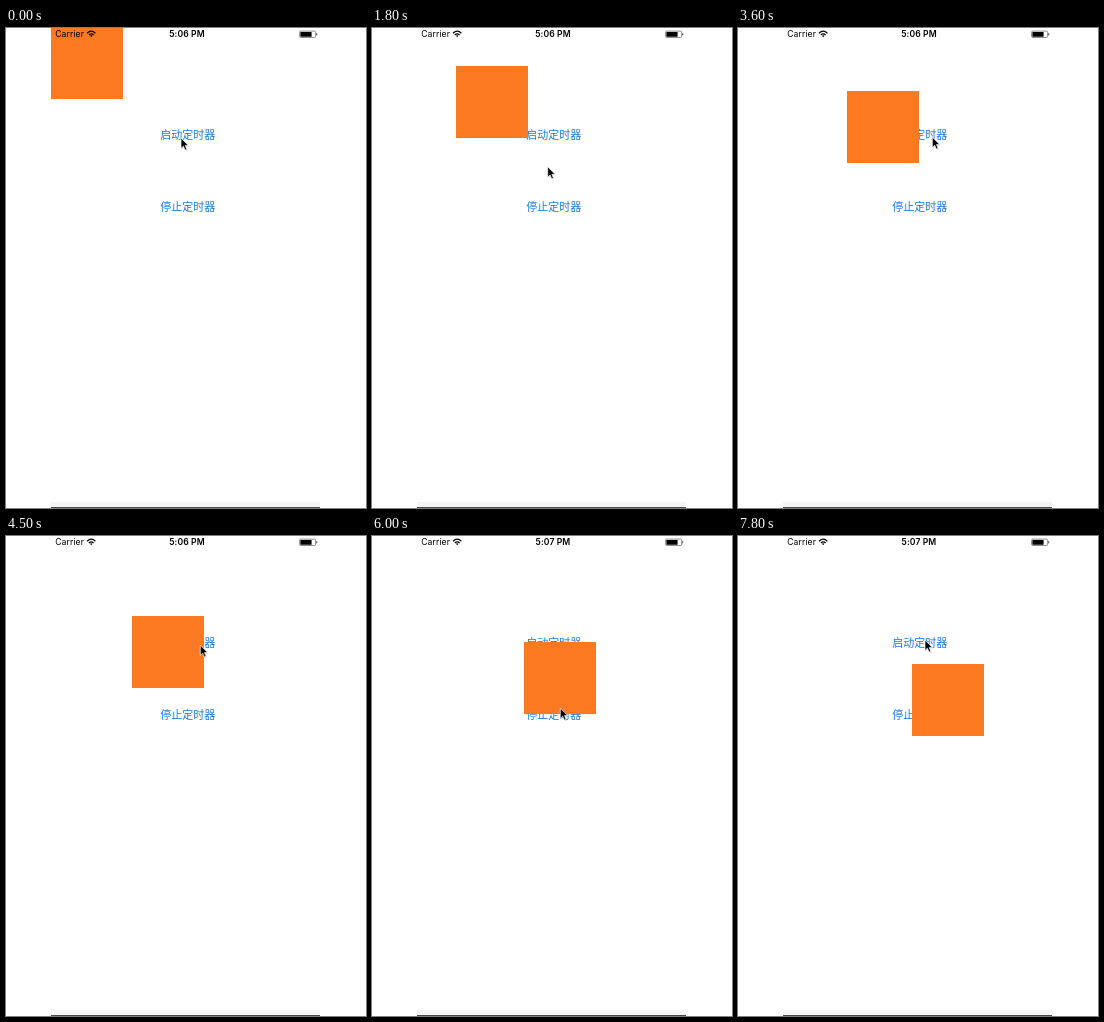
These frames come from a looping animation (360 by 480 pixels, 8000 ms). An HTML page:

```html
<!DOCTYPE html>
<html lang="zh">
<head>
<meta charset="utf-8">
<style>
  html, body { margin: 0; width: 100%; height: 100%; overflow: hidden; background: #fff; }
  svg { display: block; width: 360px; height: 480px; }
  .status { font: 8.6px Inter, Roboto, sans-serif; letter-spacing: .1px; }
  .clock { font-weight: 600; }
  .button { font: 11px "Noto Sans CJK SC", "Noto Sans CJK", sans-serif; fill: #147be4; }
</style>
</head>
<body>
<svg viewBox="0 0 360 480">
  <defs>
    <clipPath id="screen"><rect x="45" width="269" height="480"/></clipPath>
  </defs>
  <rect width="360" height="480" fill="#fff"/>
  <text class="button" x="154.3" y="111.3">启动定时器</text>
  <text class="button" x="154.3" y="183.3">停止定时器</text>
  <g clip-path="url(#screen)">
    <rect id="box" width="72" height="72" fill="#fa7921"/>
  </g>

  <text class="status" x="49.2" y="9.4">Carrier</text>
  <g fill="none" stroke="#000" stroke-width="1.2">
    <path d="M81 5.2Q85.2 1.2 89.4 5.2"/>
    <path d="M82.8 7Q85.2 4.7 87.6 7"/>
    <path d="M84 7.7Q85.2 6.7 86.4 7.7L85.2 9.2Z" fill="#000" stroke="none"/>
  </g>
  <text id="clock" class="status clock" x="181" y="9.4" text-anchor="middle"></text>
  <rect x="293.6" y="3.1" width="16" height="6.4" rx="1.2" fill="#fff" stroke="#444" stroke-width=".6"/>
  <rect x="294.4" y="3.9" width="11.2" height="4.8" rx=".5"/>
  <path d="M310.3 5.1Q311.4 5.3 311.4 6.3T310.3 7.5Z" fill="#333"/>

  <rect x="45" y="474" width="269" height="5" fill="#f4f4f4"/>
  <rect x="45" y="479" width="269" height="1" fill="#484848"/>

  <g id="cursor">
    <path d="M.6 1V11.2L3 9L4.7 13L6.7 12.2L5 8.4H8.2Z" opacity=".18"/>
    <path d="M0 0V10.4L2.4 8.2L4 12L5.8 11.2L4.2 7.6H7.4Z" stroke="#fff" stroke-width=".7"/>
  </g>
</svg>
<script>
  const LOOP = 8000, STEP = 300;
  const SPEED = 0.025; // px per ms on each axis
  const MINUTE_TURN = 5100;
  const [box, clock, cursor] = ['box', 'clock', 'cursor'].map(id => document.getElementById(id));

  // Periods in which the timer runs
  const runs = [
    { from: 245, to: 2805 },
    { from: 3825, to: 5545 },
    { from: 6920, to: LOOP }
  ];

  // The pointer glides between the two buttons and rests on each
  const rests = [
    { from: 0, to: 1200, x: 175, y: 110 },
    { from: 2500, to: 2650, x: 176.5, y: 175 },
    { from: 3400, to: 4500, x: 194.3, y: 109 },
    { from: 5500, to: 6000, x: 188.3, y: 172 },
    { from: 7000, to: LOOP, x: 187, y: 104 }
  ];

  const clamp = v => Math.min(1, Math.max(0, v));
  const ease = k => k * k * (3 - 2 * k);

  function travel(t) {
    return SPEED * runs.reduce((sum, { from, to }) => sum + Math.max(0, Math.min(t, to) - from), 0);
  }

  function pointerAt(t) {
    let { x, y, to } = rests[0];
    for (const next of rests.slice(1)) {
      const k = ease(clamp((t - to) / (next.from - to)));
      x += (next.x - x) * k;
      y += (next.y - y) * k;
      to = next.to;
    }
    return [x, y];
  }

  function move(el, x, y) {
    el.setAttribute('transform', `translate(${x} ${y})`);
  }

  function draw(now) {
    const t = Math.floor(now % LOOP / STEP) * STEP;
    const d = Math.round(travel(t));
    move(box, 45 + d, d - 1);
    move(cursor, ...pointerAt(t));
    clock.textContent = t < MINUTE_TURN ? '5:06 PM' : '5:07 PM';
  }

  let start;
  function frame(now) {
    start ??= now;
    draw(now - start);
    requestAnimationFrame(frame);
  }
  draw(0);
  requestAnimationFrame(frame);
</script>
</body>
</html>
```
